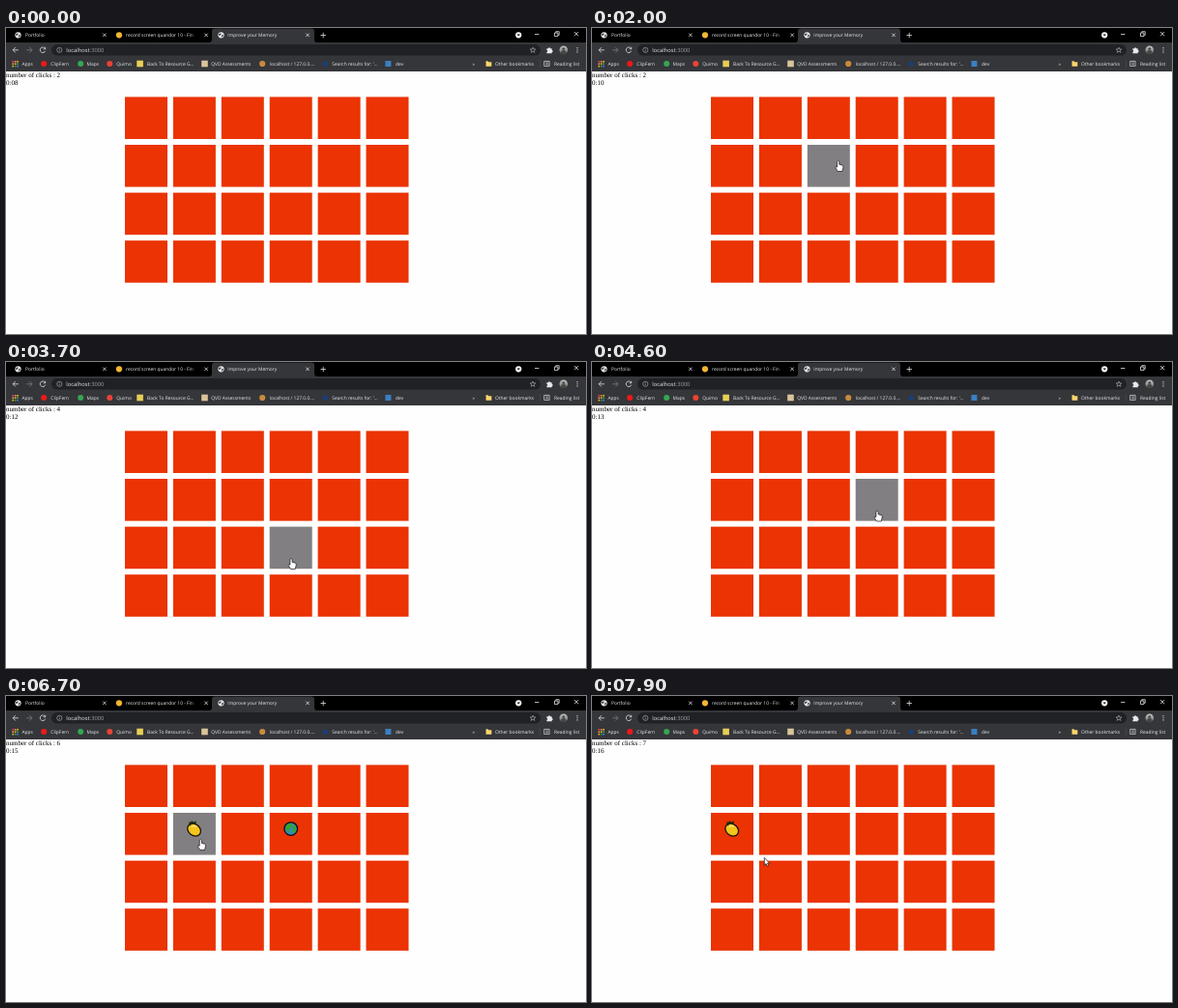
These frames come from a looping animation (600x317 px, 8000 ms). An HTML page:

```html
<!DOCTYPE html>
<html lang="en">
<head>
<meta charset="utf-8">
<title>Improve your Memory</title>
<style>
  html, body { margin: 0; width: 100%; height: 100%; overflow: hidden; background: #fefefe; }
  svg { display: block; width: 100%; height: 100%; }
  text { font: 4.9px "Open Sans", "Noto Sans", sans-serif; fill: #e8eaed; text-rendering: geometricPrecision; white-space: pre; }
  .url { font-size: 5.8px; }
  .page { font: 7.03px "Liberation Serif", "Times New Roman", serif; fill: #000; }
  .line { fill: none; stroke: #dfe1e5; stroke-width: .8; }
</style>
</head>
<body>
<svg id="stage" viewBox="0 0 600 317">
  <defs>
    <linearGradient id="fade">
      <stop offset="0" stop-color="#000" stop-opacity="0"/>
      <stop offset="1" stop-color="#000"/>
    </linearGradient>
    <linearGradient id="portrait" x2="0" y2="1">
      <stop offset="0" stop-color="#c9cac9"/>
      <stop offset="1" stop-color="#60635f"/>
    </linearGradient>
    <g id="web">
      <circle r="3.1" fill="#e8eaed"/>
      <path d="M-2.5-1Q-1-2.2 .2-1.5L-.5 .3L-2.2 .6ZM.5 .3L2.4-.6L2 1.4L.4 2.4Z" fill="#46484c"/>
    </g>
    <g id="earth">
      <circle r="6.8" fill="#3488c8" stroke="#090d12" stroke-width="1.3"/>
      <path d="M-4.8-3.4L-2.5-5.4H1L2-3.6L.4-2.5V-.8L-2-.2L-1 2L-2.6 4.5L-4.3 1.4L-5.4 .2ZM3-4L5.2-2.5L5.8 1L4.3 3.7L2.5 5L1.3 2.2L2.8 .2L1.5-1.6Z" fill="#31a52b"/>
    </g>
    <g id="fruit">
      <ellipse cx=".4" cy="1" rx="7.4" ry="5.9" transform="rotate(38)" fill="#f4c51b" stroke="#16120a" stroke-width="1.3"/>
      <path d="M-6.2-4.2L-5.2-7H-3.4L-2.8-8.4L-.8-6.8L1.4-8L2-5.8L-.5-4.6L-2.5-5L-4.4-3Z" fill="#1d2a10"/>
      <path d="M-3.2-1.8L-1-3.2L2-2.2" fill="none" stroke="#ffe88a" stroke-width="1.2"/>
    </g>
  </defs>

  <rect width="600" height="317" fill="#fefefe"/>
  <g id="chrome">
    <rect width="600" height="15" fill="#000"/>
    <path d="M210 15Q213 15 213 12V3.5Q213 .5 216 .5H316Q319 .5 319 3.5V12Q319 15 322 15H600V45H0V15Z" fill="#35363a"/>
    <rect x="47" y="17" width="506" height="11.6" rx="5.8" fill="#202124"/>
    <use href="#web" x="12.5" y="7.3"/>
    <use href="#web" x="222.5" y="7.3"/>
    <path class="line" d="M100.2 5.6l3.4 3.4m0-3.4l-3.4 3.4M205.4 5.6l3.4 3.4m0-3.4l-3.4 3.4M310.3 5.6l3.4 3.4m0-3.4l-3.4 3.4M325.5 7.5h5.4m-2.7-2.7v5.4"/>
    <circle cx="530.2" cy="7.3" r="3.1" fill="#fff"/>
    <path d="M528.5 6.4h3.4l-1.7 2.2z" fill="#111"/>
    <path class="line" d="M547 6.5h4.4M567.5 5h3.4v3.6h-3.4zM568.8 5v-1.3h3.4v3.6h-1.3M588 4l4.2 4.2m0-4.2l-4.2 4.2"/>
    <path class="line" d="M12.8 22.8H7.2m2.6-2.7l-2.7 2.7l2.7 2.7M40.4 21.2a2.8 2.8 0 1 0 .3 2.5M40.7 19.8v2h-2"/>
    <path class="line" d="M21.3 22.8h5.6m-2.6-2.7l2.7 2.7l-2.7 2.7" style="stroke:#7c7e82"/>
    <g class="line" style="stroke:#b5b8bc;stroke-width:.6">
      <circle cx="55.3" cy="22.8" r="2.6"/>
      <path d="M55.3 22.4v1.8m0-3v.6"/>
      <path d="M545 20l.8 2h2.1l-1.7 1.3l.7 2.1l-1.9-1.3l-1.9 1.3l.7-2.1l-1.7-1.3h2.1z"/>
    </g>
    <path d="M559.4 21.2h1.6a1 1 0 0 1 2 0h1.7v1.7a1 1 0 0 1 0 2v1.4h-5.3v-1.6a.9.9 0 0 0 0-1.8z" fill="#e8eaed"/>
    <circle cx="576.8" cy="22.8" r="4.3" fill="url(#portrait)"/>
    <path d="M574 26q0-3 2.8-3t2.8 3q-2.8 2-5.6 0z" fill="#444844"/>
    <circle cx="576.8" cy="21.6" r="1.4" fill="#444844"/>
    <g fill="#e8eaed">
      <circle cx="591" cy="20.7" r=".6"/><circle cx="591" cy="22.8" r=".6"/><circle cx="591" cy="24.9" r=".6"/>
    </g>
    <path d="M496.5 34.3h2l.8.9h3v4.6h-5.8z" fill="#fbd66b"/>
    <path d="M552.3 33v8" stroke="#55575b" stroke-width=".5"/>
    <path class="line" d="M556.7 34.4h5.4v5h-5.4zM558.4 36h2.4m-2.4 1.7h2.4" style="stroke-width:.7"/>
  </g>
  <g id="labels"></g>
  <rect x="190" y="2" width="12" height="11" fill="url(#fade)"/>
  <text class="url" x="62.3" y="24.9">localhost<tspan fill="#9aa0a6">:3000</tspan></text>
  <text class="page" id="clicks" x="0" y="51"></text>
  <text class="page" id="clock" x="0" y="59"></text>
  <g id="tiles"></g>
  <g id="items"></g>
  <path id="cursor" fill="#fff" stroke="#111" stroke-width=".7" stroke-linejoin="round"/>
</svg>
<script>
const LOOP = 8000, STEP = 100;
const COLS = 6, ROWS = 4, LEFT = 123, TOP = 71.4, PITCH_X = 49.9, PITCH_Y = 49.6, W = 44, H = 43.6;
const RED = '#eb3303', GRAY = '#817f82';
const HAND = 'M-1.1 .8Q0-.8 1.1 .8V3.8L4.4 4.7Q5.5 5 5.2 7L4.2 11H-.5L-2.9 7.2Q-3.1 5.5-1.1 6.6Z';
const ARROW = 'M0 0V7.8L1.8 6.2L3 8.8L4.3 8.2L3.2 5.7H5.4Z';

const $ = id => document.getElementById(id);
function add(parent, tag, attrs, text = '') {
  const el = document.createElementNS('http://www.w3.org/2000/svg', tag);
  for (const key in attrs) el.setAttribute(key, attrs[key]);
  el.textContent = text;
  return parent.appendChild(el);
}

const labels = [
  [20, 9.4, 'Portfolio'], [124, 9.4, 'record screen quandor 10 - Fin'], [229.3, 9.4, 'Improve your Memory'],
  [16.4, 39, 'Apps'], [46.3, 39, 'ClipFern'], [83.6, 39, 'Maps'], [114.3, 39, 'Quimo'],
  [146, 39, 'Back To Resource G...'], [212.3, 39, 'QVD Assessments'], [272.8, 39, 'localhost / 127.0.0....'],
  [337.3, 39, "Search results for: '..."], [403, 39, 'dev'], [482.5, 39, '»'],
  [506, 39, 'Other bookmarks'], [567, 39, 'Reading list']
];
for (const [x, y, text] of labels) add($('labels'), 'text', { x, y }, text);

const dot = (cx, cy, r, fill) => add($('chrome'), 'circle', { cx, cy, r, fill });
const square = (x, y, size, fill) => add($('chrome'), 'rect', { x, y, width: size, height: size, fill });

dot(117, 7.3, 3.1, '#f2b632');
dot(39.2, 37, 3, '#f01818');
dot(77.2, 37, 3, '#34a853');
dot(107.3, 37, 3, '#ea4335');
square(135.3, 33.7, 6.6, '#e7cf55');
square(202.2, 33.7, 6.6, '#d9c49a');
dot(265.2, 37, 3.1, '#c98a3c');
dot(330.3, 37, 2.6, '#183e7c');
square(392.4, 34, 6, '#397fc2');
const appColors = ['#ea4335', '#f28b82', '#fbbc04', '#34a853', '#4285f4'];
for (let i = 0; i < 9; i++) square(6.4 + i % 3 * 2.4, 34 + Math.floor(i / 3) * 2.4, 1.6, appColors[(i % 3 + Math.floor(i / 3))]);

const tiles = [];
for (let row = 0; row < ROWS; row++)
  for (let col = 0; col < COLS; col++) {
    const x = LEFT + col * PITCH_X, y = TOP + row * PITCH_Y;
    tiles.push({ x, y, el: add($('tiles'), 'rect', { x, y, width: W, height: H }) });
  }

// column, row, shown from, shown until, picture
const reveals = [
  [2, 1, 2200, 3400, 'fruit'], [2, 2, 2900, 3400, 'earth'],
  [3, 1, 5600, 6800, 'earth'], [1, 1, 6200, 6800, 'fruit'], [0, 1, 7600, LOOP, 'fruit']
].map(([col, row, from, to, kind]) => ({
  from, to,
  el: add($('items'), 'use', { href: '#' + kind, x: LEFT + col * PITCH_X + 22, y: TOP + row * PITCH_Y + 16.6 })
}));
const clickTimes = [2200, 2900, 5600, 6200, 7600];

// time, x, y of the pointer tip
const path = [
  [100, 470, 120], [400, 400, 190], [700, 335, 130], [900, 290, 198], [1000, 262, 224], [1100, 252, 200],
  [1500, 252, 200], [1800, 256, 150], [2000, 254.7, 137.5], [2400, 254, 140], [2900, 250, 190],
  [3300, 252, 198], [3400, 262, 226], [3500, 290, 228], [3700, 295, 203.5], [4000, 297, 178],
  [4200, 295.5, 158.5], [4600, 295, 154], [5700, 295, 154], [5800, 240, 159.5], [5900, 215.5, 157],
  [6600, 210, 150], [7100, 166.5, 143], [7200, 165.5, 144], [7600, 165.5, 144], [7900, 178.3, 167.5]
];

function pointerAt(t) {
  if (t < path[0][0]) return null;
  const i = path.findIndex(p => p[0] >= t);
  if (i < 1) return path[i < 0 ? path.length - 1 : 0].slice(1);
  const [t0, x0, y0] = path[i - 1], [t1, x1, y1] = path[i];
  const k = (t - t0) / (t1 - t0);
  return [x0 + (x1 - x0) * k, y0 + (y1 - y0) * k];
}

function draw(t) {
  const seconds = 8 + Math.floor((t + 400) / 1000);
  $('clock').textContent = '0:' + String(seconds).padStart(2, '0');
  $('clicks').textContent = 'number of clicks : ' + (2 + clickTimes.filter(c => c <= t).length);

  const tip = pointerAt(t);
  let over = false;
  for (const { x, y, el } of tiles) {
    const hit = tip && tip[0] >= x && tip[0] <= x + W && tip[1] >= y && tip[1] <= y + H;
    over = over || hit;
    el.setAttribute('fill', hit ? GRAY : RED);
  }
  for (const { from, to, el } of reveals) el.style.display = t >= from && t < to ? '' : 'none';

  $('cursor').style.display = tip ? '' : 'none';
  if (tip) {
    $('cursor').setAttribute('d', over ? HAND : ARROW);
    $('cursor').setAttribute('transform', `translate(${tip})`);
  }
}

const start = performance.now();
function tick() {
  const t = (performance.now() - start) % LOOP;
  draw(Math.floor(t / STEP) * STEP);
  requestAnimationFrame(tick);
}
tick();
</script>
</body>
</html>
```
